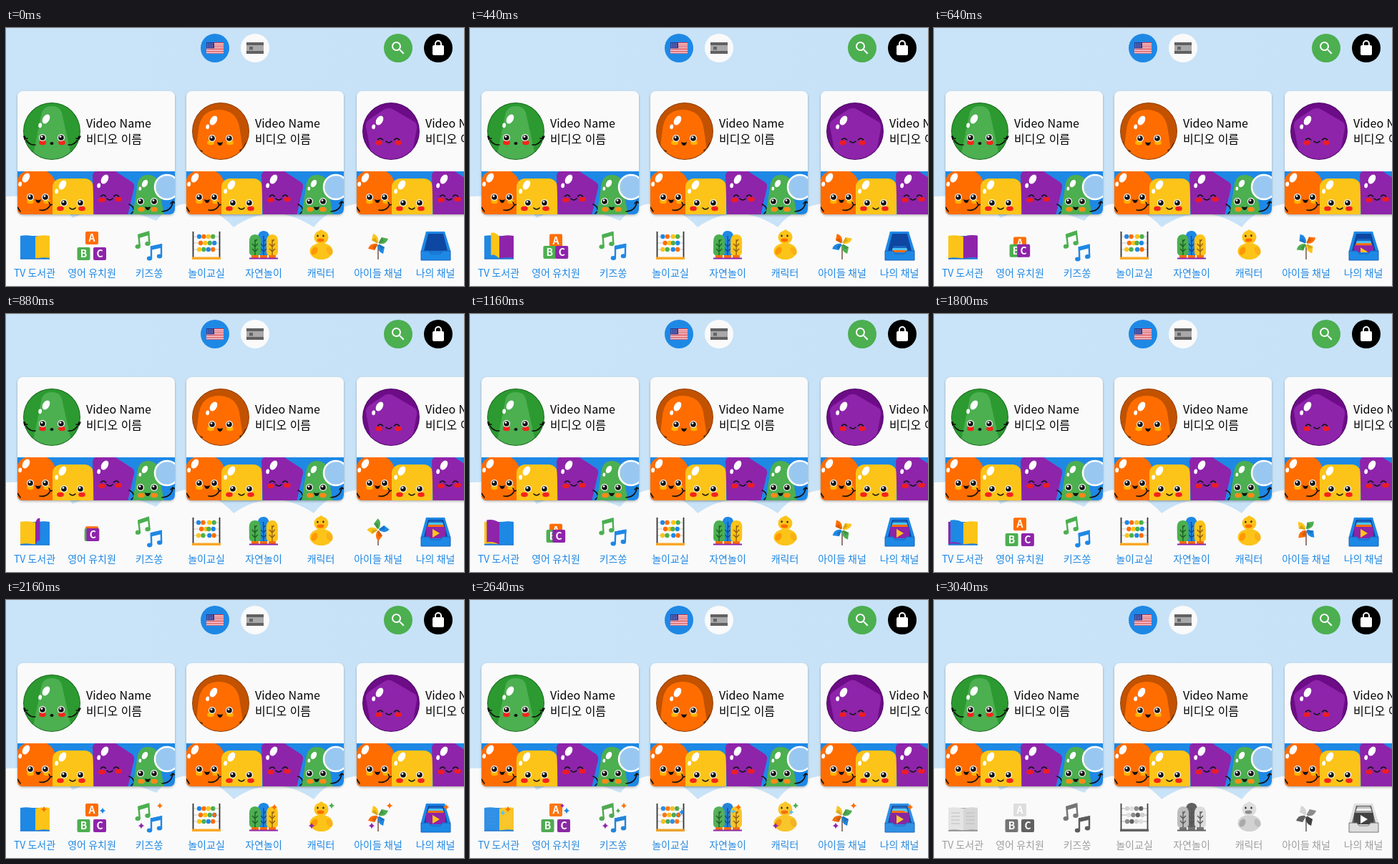
An HTML page with a canvas for the animation above (5 s loop, 640 by 360 pixels).

```html
<!DOCTYPE html>
<html lang="ko">
<head>
<meta charset="utf-8">
<title>Kids menu</title>
<style>
html, body { margin: 0; width: 100%; height: 100%; overflow: hidden; background: #c8e2f7; }
svg, canvas { position: absolute; left: 0; top: 0; width: 640px; height: 360px; }
text { font: 16px "Noto Sans CJK KR", "Noto Sans CJK", "Noto Sans", sans-serif; fill: #000; }
.line { fill: none; stroke: #111; stroke-width: 1.6; stroke-linecap: round; }
</style>
</head>
<body>
<svg viewBox="0 0 640 360">
  <defs>
    <linearGradient id="sky"><stop stop-color="#c9e3f8"/><stop offset="1" stop-color="#c7e2f7"/></linearGradient>
    <filter id="shadow" x="-10%" y="-10%" width="120%" height="125%"><feDropShadow dx="0" dy="1.5" stdDeviation="1.5" flood-opacity=".3"/></filter>
    <clipPath id="stripClip"><path d="M16 200h220v52q0 8-8 8H24q-8 0-8-8z"/></clipPath>
    <clipPath id="round"><circle cx="64" cy="144" r="39"/></clipPath>
    <g id="shine" fill="#fff"><ellipse rx="4.5" ry="7" transform="rotate(32)"/><ellipse cx="-7" cy="10" rx="2.4" ry="3.4" transform="rotate(8)"/></g>
    <g id="eye"><circle r="5" fill="#fff"/><circle r="3.8" fill="#111"/><circle cx="-1" cy="-1.4" r="1.4" fill="#fff"/></g>
    <path id="shut" class="line" d="M-3.500 1q3.500-4 7 0"/>
    <path id="smile" d="M-4 0q4 2 8 0q-1 5-4 5t-4-5z" fill="#111"/>
    <ellipse id="cheek" rx="4.8" ry="3.3"/>
    <g id="card">
      <rect x="16" y="88" width="220" height="172" rx="8" fill="#fafafa" filter="url(#shadow)"/>
      <text x="112" y="139">Video Name</text>
      <text x="112" y="161">비디오 이름</text>
      <g clip-path="url(#stripClip)">
        <path d="M16 200h220v60H16z" fill="#1e88e5"/>
        <path d="M8 262L15 214Q19 197 44 197Q65 198 70 218L77 262z" fill="#ff6d00"/>
        <use href="#shine" x="28" y="209"/>
        <use href="#cheek" x="34" y="242" fill="#ffb300"/><use href="#cheek" x="57" y="242" fill="#ffb300"/>
        <use href="#eye" x="34" y="236"/><use href="#eye" x="55" y="236"/>
        <use href="#smile" x="45" y="239"/>
        <path class="line" d="M47 254q10 2 15-7m-2-4l2 4l4-1M16 250l4 6"/>
        <rect x="65" y="210" width="57" height="64" rx="12" fill="#fcc419"/>
        <use href="#shine" x="79" y="219"/>
        <use href="#cheek" x="76" y="252" fill="#f4241c"/><use href="#cheek" x="106" y="252" fill="#f4241c"/>
        <use href="#eye" x="81" y="244"/><use href="#eye" x="104" y="244"/>
        <path class="line" d="M89 251q4 4 8 0"/>
        <path d="M121 205Q122 199 130 199L146 198Q151 198 156 202L176 215Q180 218 179 223L170 262H123z" fill="#8e24aa"/>
        <use href="#shine" x="138" y="211"/>
        <use href="#cheek" x="134" y="240" fill="#ed1c24"/><use href="#cheek" x="157" y="239" fill="#ed1c24"/>
        <use href="#shut" x="136" y="234"/><use href="#shut" x="154" y="234"/>
        <path class="line" d="M141 238q4 4 8 0M172 246q6 2 7 9m-4 4l4-4"/>
        <path d="M177 262L184 217Q187 204 200 205Q211 206 213 217L221 262z" fill="#4caf50"/>
        <g transform="translate(194 217) scale(.8)"><use href="#shine"/></g>
        <use href="#cheek" x="189" y="253" fill="#ff8a16"/><use href="#cheek" x="207" y="253" fill="#ff8a16"/>
        <use href="#eye" x="188" y="242"/><use href="#eye" x="207" y="242"/>
        <use href="#smile" x="198" y="249"/>
        <circle cx="225" cy="222" r="17" fill="#a3cdf3" fill-opacity=".92" stroke="#fff" stroke-width="2.500"/>
        <path class="line" d="M218 256q12 0 15-12m-3 1l3-3l3 2"/>
      </g>
    </g>
  </defs>

  <path fill="url(#sky)" d="M0 0h640v360H0z"/>
  <path fill="#fafafa" d="M0 235Q70 230 93 265Q145 240 210 269Q226 249 252 245Q292 249 318 278Q373 240 430 278Q452 249 500 244Q580 236 640 254V360H0z"/>

  <circle cx="292" cy="28" r="20" fill="#1e88e5"/>
  <path fill="#fff" d="M280 20h24v15.600h-24z"/>
  <path stroke="#d32f3f" stroke-width="1.200" d="M280 20.600h24m-24 2.400h24m-24 2.400h24m-24 2.400h24m-24 2.400h24m-24 2.400h24m-24 2.400h24"/>
  <path fill="#283593" d="M280 20h11v8.400h-11z"/>
  <path stroke="#fff" stroke-width=".8" stroke-dasharray="1 1.2" d="M281 22h9m-9 2.2h9m-9 2.2h9"/>
  <circle cx="348" cy="28" r="20" fill="#fafafa"/>
  <path fill="#616161" d="M336 20h24v16h-24z"/><path fill="#a8a8a8" d="M336 24h24v8h-24z"/>
  <path fill="#666" d="M340 26h5v4.500h-5z"/>
  <circle cx="548" cy="28" r="20" fill="#4caf50"/>
  <path fill="#fff" transform="translate(536 16)" d="M15.500 14h-.79l-.28-.27A6.47 6.47 0 0 0 16 9.500 6.500 6.500 0 1 0 9.500 16c1.610 0 3.090-.59 4.230-1.570l.27.28v.79l5 4.990L20.490 19zm-6 0a4.500 4.500 0 1 1 0-9a4.500 4.500 0 0 1 0 9z"/>
  <circle cx="604" cy="28" r="20"/>
  <rect x="596" y="24" width="16" height="14" rx="2" fill="#fff"/>
  <path d="M600 25v-3a4 4 0 0 1 8 0v3" fill="none" stroke="#fff" stroke-width="2"/>

  <use href="#card"/><use href="#card" x="236"/><use href="#card" x="474"/>

  <circle cx="64" cy="144" r="40" fill="#17691d"/>
  <g clip-path="url(#round)">
    <path fill="#2c9a30" d="M20 100h90v90H20z"/>
    <path fill="#4caf50" d="M36 186L50 118Q53 109 64 109Q75 109 78 118L93 186z"/>
    <use href="#shine" x="56" y="127"/>
    <use href="#cheek" x="51" y="160" fill="#f4241c"/><use href="#cheek" x="78" y="160" fill="#f4241c"/>
    <use href="#eye" x="51" y="153"/><use href="#eye" x="77" y="153"/>
    <ellipse cx="64" cy="161" rx="2.500" ry="2" fill="#111"/>
  </g>
  <path class="line" d="M26 151q4 13 15 12M25 151l1 4l4-1M102 151q-4 13-15 12M104 151l-2 4l-4-1"/>

  <g transform="translate(236 0)">
    <circle cx="64" cy="144" r="40" fill="#8f3c00"/>
    <g clip-path="url(#round)">
      <path fill="#c25200" d="M20 100h90v90H20z"/>
      <path fill="#ff6d00" d="M27 190L33 142Q36 115 60 114Q85 114 90 137L98 190z"/>
      <use href="#shine" x="54" y="129"/>
      <use href="#cheek" x="50" y="160" fill="#ffb300"/><use href="#cheek" x="77" y="160" fill="#ffb300"/>
      <use href="#eye" x="52" y="154"/><use href="#eye" x="76" y="154"/>
      <use href="#smile" x="63" y="159"/>
      <path class="line" d="M28 160q3 10 10 12M99 161q-3 8-8 10"/>
    </g>
  </g>

  <g transform="translate(474 0)">
    <circle cx="64" cy="144" r="40" fill="#4e0766"/>
    <g clip-path="url(#round)">
      <path fill="#6c0c86" d="M20 100h90v90H20z"/>
      <path fill="#8e24aa" d="M29 138Q28 132 33 128L54 114Q60 110 66 113L97 131Q101 134 100 140L91 190H39z"/>
      <use href="#shine" x="48" y="129"/>
      <use href="#cheek" x="47" y="160" fill="#ed1c24"/><use href="#cheek" x="74" y="160" fill="#ed1c24"/>
      <use href="#shut" x="49" y="155"/><use href="#shut" x="72" y="155"/>
      <path class="line" d="M57 158q4 4 8 0"/>
    </g>
  </g>
</svg>
<canvas id="icons" width="640" height="360"></canvas>

<script>
const ctx = document.getElementById('icons').getContext('2d');
const FONT = '"Noto Sans CJK KR", "Noto Sans CJK", "Noto Sans", sans-serif';
const BLUE = '#1e88e5', GREEN = '#4caf50', YELLOW = '#fcc419', ORANGE = '#ff6d00', PURPLE = '#8e24aa', CYAN = '#4fc3f7';
const LABELS = ['TV 도서관', '영어 유치원', '키즈쏭', '놀이교실', '자연놀이', '캐릭터', '아이들 채널', '나의 채널'];
const PAGES = [BLUE, YELLOW, PURPLE, BLUE, YELLOW];
// x, y, colour, start, radius
const SPARKLES = [
  [53, 292, ORANGE, 1850, 4], [46, 297, CYAN, 2240, 3.5],
  [135, 294, BLUE, 1850, 4.5], [129, 287, PURPLE, 2240, 3],
  [215, 287, ORANGE, 1800, 4], [189, 315, PURPLE, 1850, 4.5], [207, 294, GREEN, 2240, 3.5],
  [291, 300, ORANGE, 1850, 4], [296, 296, BLUE, 2240, 4],
  [375, 289, ORANGE, 1850, 4.5], [368, 295, CYAN, 2240, 3.5],
  [455, 287, GREEN, 1800, 4.5], [427, 315, PURPLE, 1850, 4.5], [449, 296, CYAN, 2240, 3.5],
  [536, 287, ORANGE, 1800, 4.5], [511, 315, PURPLE, 1850, 4.5], [528, 295, GREEN, 2240, 3.5],
  [615, 289, ORANGE, 1850, 4.5], [609, 294, CYAN, 2240, 3.5]
];
let t = 0, fade = 0;

const part = (a, b) => Math.min(1, Math.max(0, (t - a) / (b - a)));
const ease = (a, b) => { const p = part(a, b); return p * p * (3 - 2 * p); };
const rgb = hex => [1, 3, 5].map(i => parseInt(hex.slice(i, i + 2), 16));
function mix(from, to, k) {
  const a = rgb(from), b = rgb(to);
  return '#' + a.map((v, i) => Math.round(v + (b[i] - v) * k).toString(16).padStart(2, '0')).join('');
}
const tone = (colour, gray) => mix(colour, gray, fade);

function fill(d, colour, gray) { ctx.fillStyle = tone(colour, gray); ctx.fill(new Path2D(d)); }
function stroke(d, width, colour, gray) {
  ctx.lineWidth = width;
  ctx.strokeStyle = tone(colour, gray);
  ctx.stroke(new Path2D(d));
}
function oval(x, y, rx, ry, colour, gray) {
  ctx.beginPath();
  ctx.ellipse(x, y, rx, ry, 0, 0, 7);
  ctx.fillStyle = tone(colour, gray);
  ctx.fill();
}
function box(x, y, w, h, r, colour, gray) {
  ctx.beginPath();
  ctx.roundRect(x, y, w, h, r);
  ctx.fillStyle = tone(colour, gray);
  ctx.fill();
}
function at(x, y, angle, draw) {
  ctx.save();
  ctx.translate(x, y);
  ctx.rotate(angle);
  draw();
  ctx.restore();
}

// Three leaves turn one after another from right to left.
function book() {
  const page = (reach, lift, colour, gray) =>
    fill(`M41 291Q${41 + reach / 2} ${288 - lift} ${41 + reach} ${290 - lift}V${321 - lift}Q${41 + reach / 2} ${319 - lift} 41 322z`, colour, gray);
  const turn = 630, leaf = Math.min(3, Math.floor(t / turn));
  const angle = leaf < 3 ? t % turn / turn * Math.PI : 0;
  box(20, 290, 41, 32, 0, BLUE, '#9e9e9e');
  page(-21, 0, PAGES[leaf], '#e4e4e4');
  page(20, 0, PAGES[angle ? leaf + 2 : leaf + 1], '#d6d6d6');
  if (angle) page(20 * Math.cos(angle), 5 * Math.sin(angle), PAGES[leaf + 1], '#eeeeee');
  ctx.globalAlpha = fade;
  stroke('M24 297h12m-12 5h12m-12 5h12m-12 5h12M45 297h12m-12 5h12m-12 5h12m-12 5h12', 1, '#bdbdbd', '#bdbdbd');
  ctx.globalAlpha = 1;
  stroke('M20 322H61', 1.500, '#1976d2', '#8c8c8c');
}

function blocks() {
  const shrink = part(0, 880), grow = part(960, 1900);
  const spread = Math.max(.12, t < 920 ? 1 - shrink ** 2 : 1 - (1 - grow) ** 2);
  ctx.textAlign = 'center';
  ctx.font = `bold 14px ${FONT}`;
  const block = (dx, dy, letter, colour, gray) => {
    const x = 120 + dx * spread, y = 307 + dy * spread;
    box(x - 9, y - 9, 18, 18, 2, colour, gray);
    ctx.fillStyle = '#fff';
    ctx.fillText(letter, x, y + 5);
  };
  block(0, -14, 'A', ORANGE, '#dddddd');
  block(-11.500, 8, 'B', GREEN, '#757575');
  block(11, 8, 'C', PURPLE, '#616161');
}

function notes() {
  const wave = Math.sin(part(0, 2000) * Math.PI * 4);
  const note = (colour, gray) => {
    stroke('M-5 9V-7L9 -10V6', 2.400, colour, gray);
    fill('M-6 -8L10 -11.500V-6L-6 -2.500z', colour, gray);
    oval(-7.500, 9, 3.700, 3, colour, gray);
    oval(6.500, 6, 3.700, 3, colour, gray);
  };
  at(191, 295.500 + wave * .7, -.08 + wave * .04, () => note(GREEN, '#757575'));
  at(208, 312.500 - wave, wave * .04, () => note(BLUE, '#5c5c5c'));
}

function abacus() {
  const slide = Math.sin(part(0, 2000) * Math.PI);
  stroke('M262 291H298M262 300H298M262 309H298', .8, '#bdbdbd', '#9e9e9e');
  const colours = [BLUE, ORANGE, YELLOW, GREEN], grays = ['#d0d0d0', '#e0e0e0', '#8c8c8c', '#616161'];
  for (let row = 0; row < 3; row++) {
    for (let i = 0; i < 4; i++) {
      const shift = (row % 2 ? -1 : 1) * slide * (i > 1 ? 1.500 : -1);
      oval(270 + i * 6.400 + (row === 1 ? 2 : 0) + shift, 291 + row * 9, 3.100, 3.200,
        colours[(i + row) % 4], grays[(i + row) % 4]);
    }
  }
  stroke('M261.500 284V320M298.500 284V320', 1.800, '#333333', '#424242');
  box(260, 319.500, 40, 3.500, 0, '#f9a825', '#616161');
}

function trees() {
  const sway = Math.sin(part(0, 2000) * Math.PI * 4) * .02;
  const tree = (x, top, colour, gray, dark) => {
    at(x, 318, sway, () => {
      const h = top - 318;
      fill(`M-8 -5V${h + 10}Q-8 ${h} 0 ${h}T8 ${h + 10}V-5Q8 0 0 0T-8 -5z`, colour, gray);
      stroke(`M0 4V${h + 7}M0 -13L-4 -17M0 -13L4 -17M0 -6L-4 -10M0 -6L4 -10M0 -20L3 -23`, 1.300, dark, '#555555');
    });
    box(x - 5, 317, 10, 4, 1, ORANGE, '#757575');
  };
  tree(360, 283, BLUE, '#616161', '#0d47a1');
  tree(348, 288, GREEN, '#bdbdbd', '#1b5e20');
  tree(372, 288, YELLOW, '#dcdcdc', '#8d5b14');
  stroke('M340 321.500H380', 1.800, PURPLE, '#616161');
}

function duck() {
  const wave = Math.sin(part(0, 2000) * Math.PI * 4);
  oval(440.500, 311.500, 16, 11.500, YELLOW, '#d2d2d2');
  at(431, 311, .5 + wave * .1, () => oval(0, 0, 4, 6, '#ff9800', '#aaaaaa'));
  at(452, 311, -.5 - wave * .1, () => oval(0, 0, 4, 6, '#f9b115', '#bdbdbd'));
  at(440.500, 292, wave * .06, () => {
    oval(0, 0, 10, 9.500, YELLOW, '#dddddd');
    fill('M-3 -8Q-1 -12 2 -10L3 -7z', YELLOW, '#dddddd');
    oval(-5, -2, 1.200, 1.500, '#222222', '#222222');
    oval(3, -2, 1.200, 1.500, '#222222', '#222222');
    oval(-1, 4, 5, 2.500, ORANGE, '#8c8c8c');
  });
}

function pinwheel() {
  stroke('M520 301V323', 1.800, '#8d6e63', '#757575');
  at(520, 301, ease(0, 2000) * Math.PI * 4, () => {
    const blades = [[YELLOW, '#d5d5d5'], [GREEN, '#8c8c8c'], [BLUE, '#424242'], [ORANGE, '#616161']];
    for (const [colour, gray] of blades) {
      fill('M0 0L-9 -5L-7 -14Q2 -11 0 0z', colour, gray);
      fill('M0 0L-9 -5L-4 -8z', mix(colour, '#000000', .15), gray);
      ctx.rotate(Math.PI / 2);
    }
  });
  oval(520, 301, 1.600, 1.600, '#ffffff', '#ffffff');
}

function tray() {
  const rise = ease(160, 880);
  fill('M587 284H613L621 310V324H580V310z', BLUE, '#e0e0e0');
  fill('M590 287H611L617 311H584z', '#0d47a1', '#616161');
  ctx.save();
  ctx.beginPath();
  ctx.rect(580, 284, 41, 29);
  ctx.clip();
  const card = (x, y, w, colour, gray) => box(x, y + 24 * (1 - rise), w, 24, 1.500, colour, gray);
  card(591, 288, 19, '#1565c0', '#bdbdbd');
  card(590, 291, 21, CYAN, '#eeeeee');
  card(589, 294, 23, ORANGE, '#9e9e9e');
  card(587, 297, 27, PURPLE, '#424242');
  const y = 306 + 24 * (1 - rise);
  fill(`M596 ${y - 6}L606 ${y}L596 ${y + 6}z`, YELLOW, '#ffffff');
  ctx.restore();
  fill('M580 311H591L594 315H607L610 311H621V322Q621 324 619 324H582Q580 324 580 322z', BLUE, '#dddddd');
  stroke('M580 311H591L594 315H607L610 311H621V324H580z', 1, '#1565c0', '#757575');
}

function sparkles() {
  for (const [x, y, colour, start, radius] of SPARKLES) {
    const r = radius * ease(start, start + 280) * (1 - ease(2720, 3040));
    if (r <= 0) continue;
    at(x, y, 0, () => {
      const q = r * .2;
      fill(`M0 ${-r}Q${q} ${-q} ${r} 0Q${q} ${q} 0 ${r}Q${-q} ${q} ${-r} 0Q${-q} ${-q} 0 ${-r}z`, colour, colour);
    });
  }
}

function labels() {
  ctx.font = `14px ${FONT}`;
  ctx.textAlign = 'center';
  ctx.fillStyle = tone(BLUE, '#9e9e9e');
  LABELS.forEach((label, i) => ctx.fillText(label, 40 + i * 80, 347));
}

function frame() {
  t = Math.floor(performance.now() % 5000 / 40) * 40;
  fade = part(2600, 3040);
  ctx.clearRect(0, 0, 640, 360);
  for (const draw of [book, blocks, notes, abacus, trees, duck, pinwheel, tray, sparkles, labels]) draw();
  requestAnimationFrame(frame);
}
frame();
</script>
</body>
</html>
```
